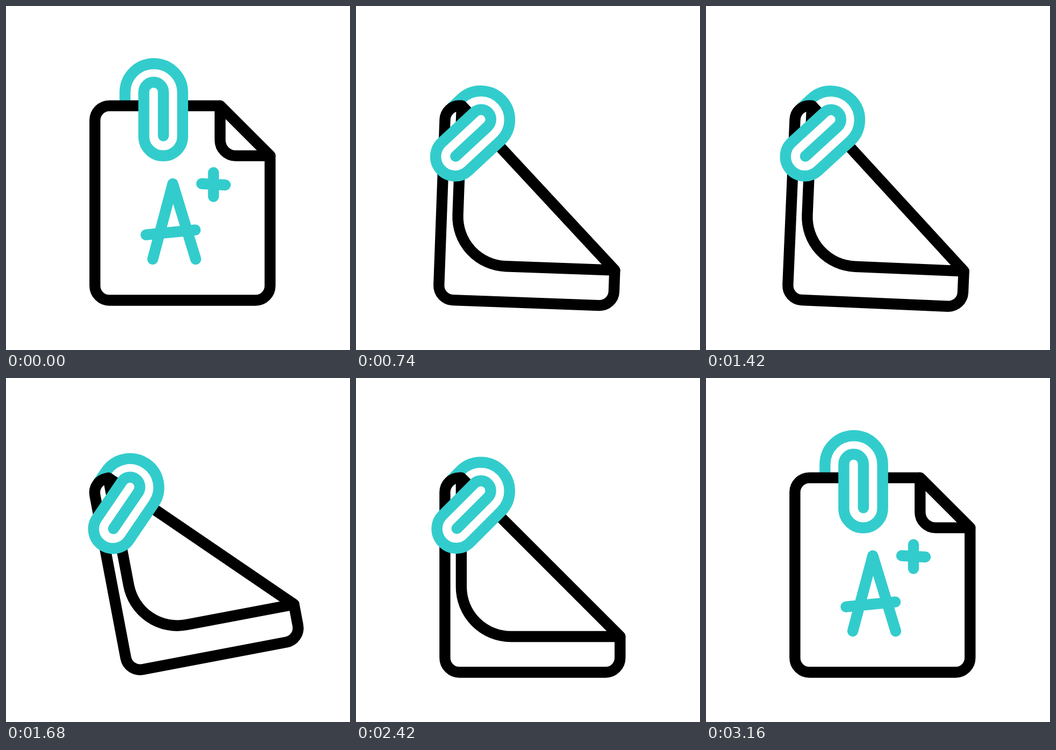
These frames come from a looping animation (640x640 px, 3360 ms). An HTML page with a canvas:

```html
<!DOCTYPE html>
<html>
<head>
<meta charset="utf-8">
<style>
  html, body { margin: 0; height: 100%; overflow: hidden; background: #fff; }
  canvas { display: block; width: 640px; height: 640px; }
</style>
</head>
<body>
<canvas id="stage" width="640" height="640"></canvas>
<script>
const ctx = document.getElementById('stage').getContext('2d');
const LOOP = 3360, TEAL = '#33cccc', BLACK = '#000', WHITE = '#fff';
const LEFT = 165.4, TOP = 185.6, RIGHT = 491.3, BOTTOM = 547.5, CORNER = 27;

// Keys are [time, value] pairs
const foldKeys = [[200, 0], [604, 1], [2700, 1], [3160, 0]];
const swingKeys = [[600, 0], [1202, 16.2], [1640, -11.3], [1975, 4.1], [2420, 0]];

const grade = new Path2D('M273 471L310.3 330.8L353 471M260.5 425.7L352 416.7M386 310V354.5M364 330.5L408 333');
const clipBack = new Path2D('M221.4 187V160.8A53.6 53.6 0 0 1 275 107.2');
const clipFront = new Path2D('M274.5 107.2H275A53.6 53.6 0 0 1 328.6 160.8V242.7A36.1 36.1 0 0 1 256.4 242.7V160A18.2 18.2 0 0 1 292.8 160V241.5');
const clipInside = new Path2D('M256.4 160A36.1 36.1 0 0 1 328.6 160V242.7A36.1 36.1 0 0 1 256.4 242.7Z');

function valueAt(keys, t) {
  const i = keys.findIndex(key => key[0] > t);
  if (i < 0) return keys[keys.length - 1][1];
  if (i === 0) return keys[0][1];
  const [t0, v0] = keys[i - 1], [t1, v1] = keys[i];
  return v0 + (v1 - v0) * (1 - Math.cos(Math.PI * (t - t0) / (t1 - t0))) / 2;
}

function rotateAbout(x, y, degrees) {
  ctx.translate(x, y);
  ctx.rotate(degrees * Math.PI / 180);
  ctx.translate(-x, -y);
}

function stroke(path, color) {
  ctx.strokeStyle = color;
  ctx.stroke(path);
}

function fill(path) {
  ctx.fillStyle = WHITE;
  ctx.fill(path);
}

function isolated(paint) {
  ctx.save();
  paint();
  ctx.restore();
}

function inClipSpace(fold, paint) {
  isolated(() => {
    ctx.translate(-65.6 * fold, 40.1 * fold);
    rotateAbout(275, 193, 45 * fold);
    paint();
  });
}

function paperPath(foldX, foldY) {
  const p = new Path2D();
  p.moveTo(foldX, TOP);
  p.lineTo(RIGHT, foldY);
  p.arcTo(RIGHT, BOTTOM, LEFT, BOTTOM, CORNER);
  p.arcTo(LEFT, BOTTOM, LEFT, TOP, CORNER);
  p.arcTo(LEFT, TOP, foldX, TOP, CORNER);
  p.closePath();
  return p;
}

function flapPath(foldX, foldY) {
  const p = new Path2D();
  p.moveTo(foldX, TOP);
  p.arcTo(foldX, foldY, RIGHT, foldY, 0.312 * (foldY - TOP));
  p.lineTo(RIGHT, foldY);
  p.closePath();
  return p;
}

function draw(t) {
  const fold = valueAt(foldKeys, t);
  const size = 93 + 202.4 * fold;
  const paper = paperPath(RIGHT - size, TOP + size);
  const flap = flapPath(RIGHT - size, TOP + size);

  fill(new Path2D('M0 0H640V640H0Z'));
  isolated(() => {
    ctx.lineWidth = 20.4;
    ctx.lineJoin = 'round';
    rotateAbout(195.5, 215, valueAt(swingKeys, t));

    inClipSpace(fold, () => stroke(clipBack, TEAL));
    fill(paper);
    isolated(() => {
      ctx.clip(paper);
      ctx.lineCap = 'round';
      stroke(grade, TEAL);
    });
    fill(flap);
    stroke(paper, BLACK);
    stroke(flap, BLACK);
    inClipSpace(fold, () => {
      fill(clipInside);
      ctx.lineCap = 'round';
      stroke(clipFront, TEAL);
    });
  });
}

function tick() {
  draw(performance.now() % LOOP);
  requestAnimationFrame(tick);
}
tick();
</script>
</body>
</html>
```
